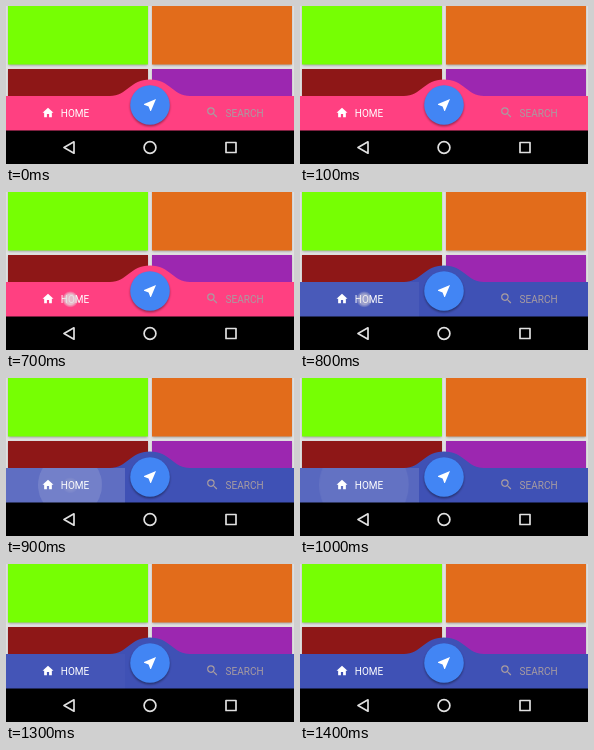
An HTML page that plays this animation: 288 px wide and 158 px high, repeating every 1700 ms.

```html
<!DOCTYPE html>
<html lang="en">
<head>
<meta charset="utf-8">
<title>Bottom bar</title>
<style>
html, body { margin: 0; width: 100%; height: 100%; overflow: hidden; background: #000; }
svg { display: block; width: 100vw; height: 100vh; }
text { font: 10px Roboto, sans-serif; }
.bar, .press, .ripple, .touch { animation: 1700ms step-end infinite; }
.bar { fill: #ff4081; animation-name: bar; }
.press { fill: #fff; opacity: 0; animation-name: press; }
.ripple { fill: #fff; opacity: 0; transform-origin: 64px 107px; animation-name: ripple; }
.touch { opacity: 0; animation-name: touch; }
@keyframes bar {
  0% { fill: #ff4081; }
  47.05%, 100% { fill: #3f51b5; }
}
@keyframes press {
  0% { opacity: 0; }
  47.05% { opacity: .05; }
  52.94% { opacity: .17; }
  58.82% { opacity: .13; }
  64.7% { opacity: .09; }
  70.58% { opacity: .05; }
  76.47% { opacity: .025; }
  82.35%, 100% { opacity: 0; }
}
@keyframes ripple {
  0% { opacity: 0; transform: scale(.3); }
  52.94% { opacity: .13; transform: scale(1); }
  58.82% { opacity: .07; transform: scale(1.4); }
  64.7%, 100% { opacity: 0; transform: scale(1.4); }
}
@keyframes touch {
  0% { opacity: 0; }
  41.17% { opacity: .8; }
  47.05% { opacity: .55; }
  52.94% { opacity: .13; }
  58.82%, 100% { opacity: 0; }
}
</style>
</head>
<body>
<svg viewBox="0 0 288 158" preserveAspectRatio="none">
  <defs>
    <clipPath id="tab"><rect y="90" width="119" height="34.5"/></clipPath>
    <filter id="soft" x="-30%" y="-30%" width="160%" height="160%"><feGaussianBlur stdDeviation="1.2"/></filter>
    <radialGradient id="dot">
      <stop offset=".65" stop-color="#e2dcde"/>
      <stop offset="1" stop-color="#e2dcde" stop-opacity=".15"/>
    </radialGradient>
  </defs>

  <rect width="288" height="126" fill="#e2e2e2"/>
  <g fill="#777" opacity=".6" filter="url(#soft)">
    <rect x="2.5" y="-10" width="139" height="69.5"/>
    <rect x="146.5" y="-10" width="139" height="69.5"/>
    <rect x="2.5" y="64" width="139" height="60"/>
    <rect x="146.5" y="64" width="139" height="60"/>
  </g>
  <rect x="2" y="-4" width="140" height="62.5" fill="#76ff03"/>
  <rect x="146" y="-4" width="140" height="62.5" fill="#e26c1b"/>
  <rect x="2" y="63" width="140" height="60" fill="#8e1717"/>
  <rect x="146" y="63" width="140" height="60" fill="#9c27b0"/>

  <path class="bar" d="M0 90H104C121 90 124 73.5 144 73.5S167 90 184 90H288V125H0Z"/>
  <g clip-path="url(#tab)">
    <rect class="press" y="90" width="119" height="35"/>
    <circle class="ripple" cx="64" cy="107" r="32"/>
  </g>

  <g fill="#fff">
    <path transform="translate(35.4 100.2) scale(.55)" d="M10 20v-6h4v6h5v-8h3L12 3 2 12h3v8z"/>
    <text x="54.8" y="110.6">HOME</text>
  </g>
  <g fill="#a89ca0">
    <path transform="translate(199.4 99.6) scale(.58)" d="M15.5 14h-.79l-.28-.27A6.47 6.47 0 0 0 16 9.5 6.5 6.5 0 1 0 9.5 16c1.61 0 3.09-.59 4.23-1.57l.27.28v.79l5 4.99L20.49 19zm-6 0C7 14 5 12 5 9.5S7 5 9.5 5 14 7 14 9.5 12 14 9.5 14z"/>
    <text x="219.6" y="110.6">SEARCH</text>
  </g>
  <circle class="touch" cx="64.3" cy="107.3" r="8" fill="url(#dot)"/>

  <circle cx="144" cy="100.5" r="19.8" opacity=".4" filter="url(#soft)"/>
  <circle cx="144" cy="99" r="19.8" fill="#4285f4"/>
  <path transform="translate(136 91) scale(.667)" fill="#fff" d="M21 3 3 10.53v.98l6.84 2.65L12.48 21h.98z"/>

  <rect y="124.5" width="288" height="34"/>
  <g fill="none" stroke="#e0e0e0" stroke-width="1.7" stroke-linejoin="round">
    <path d="M58 141.5 68 135.8V147.2Z"/>
    <circle cx="144" cy="141.5" r="5.9"/>
    <rect x="220" y="136.5" width="10" height="10"/>
  </g>
</svg>
</body>
</html>
```
